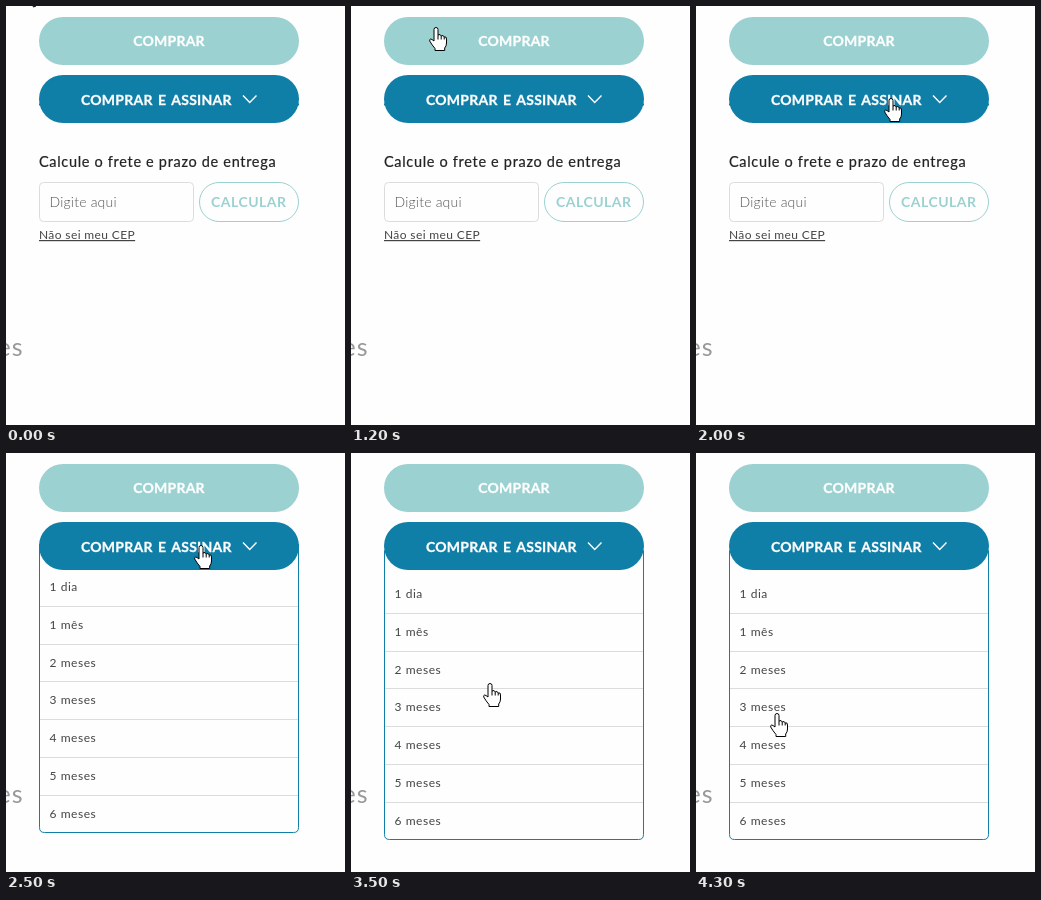
Write an HTML page that moves like this. It is 339x419 px and loops after 4.6 s.

```html
<!DOCTYPE html>
<html lang="pt">
<head>
<meta charset="utf-8">
<style>
  html, body { margin: 0; width: 100%; height: 100%; overflow: hidden; background: #fefefe; }
  svg { display: block; width: 339px; height: 419px; }
  text { font: 14px Lato, "Open Sans", sans-serif; fill: #222; }
  .bold { font-weight: 700; fill: #fff; stroke: #fff; stroke-width: .3px; letter-spacing: .25px; word-spacing: 1.7px; }
  .title { font-size: 14.5px; letter-spacing: .68px; stroke: #222; stroke-width: .2px; }
  .hint { font-weight: 300; fill: #555; letter-spacing: .2px; }
  .calc { font-weight: 700; fill: #9bd1d1; letter-spacing: .5px; }
  .link { font-size: 12px; fill: #444; letter-spacing: .38px; text-decoration: underline; }
  .heading { font-size: 25px; fill: #999; letter-spacing: 1px; }
  .item { font-size: 12px; fill: #444; letter-spacing: .55px; }
  .line { fill: none; stroke: #dcdcdc; }
  .cursor path { fill: #fff; stroke: #000; stroke-linejoin: round; }
</style>
</head>
<body>
<svg viewBox="0 0 339 419">
  <text class="heading" x="17.5" y="350" text-anchor="end">es</text>

  <g id="form">
    <text class="title" x="33" y="161">Calcule o frete e prazo de entrega</text>
    <rect class="line" x="33.5" y="176.5" width="154" height="39" rx="4"/>
    <text class="hint" x="43.5" y="201">Digite aqui</text>
    <rect x="193.5" y="176.5" width="99" height="39" rx="19.5" fill="none" stroke="#9bd1d1"/>
    <text class="calc" x="205" y="201">CALCULAR</text>
    <text class="link" x="33" y="233">Não sei meu CEP</text>
  </g>

  <g id="menu">
    <path d="M33.5 98V381.5q0 5 5 5H287.5q5 0 5-5V98" fill="#fefefe" stroke="#107fa8"/>
  </g>

  <rect x="33" y="11" width="260" height="48" rx="24" fill="#9bd1d1"/>
  <text class="bold" x="163" y="40" text-anchor="middle">COMPRAR</text>
  <path d="M33 98.5H293" stroke="#107fa8" stroke-width="2"/>
  <rect x="33" y="69" width="260" height="48" rx="24" fill="#107fa8"/>
  <text class="bold" x="75" y="99">COMPRAR E ASSINAR</text>
  <path d="M237 89.5l6.7 7 6.8-7" fill="none" stroke="#fff" stroke-width="1.4"/>

  <g id="arrow" class="cursor">
    <path d="M0 0V16L4 12.5L6.5 18L9 17L6.5 12H12Z"/>
  </g>
  <g id="hand" class="cursor">
    <path d="M-2 14V2.5Q-2 .5 0 .5T2 2.5V8Q4.5 6.5 5.2 9Q7.5 7.5 8.2 10Q10.5 9 10.5 12V16Q10.5 19 8.7 21V23.5H-1V21.5Q-4 18 -6.3 14Q-6.6 10 -2 14Z"/>
    <path d="M2 8v4.5M5.2 9v3.5M8.2 10v2.5"/>
  </g>
</svg>
<script>
  const $ = id => document.getElementById(id);
  const LOOP = 4600, STEP = 100, OPEN = 2500, ROW = 37.8;

  const labels = ["1 dia", "1 mês", ...[2, 3, 4, 5, 6].map(n => n + " meses")];
  $("menu").innerHTML += labels.map((label, i) => {
    const y = Math.round(i * ROW);
    const rule = i ? `<path class="line" d="M34 ${y + 122.5}H292"/>` : "";
    return `${rule}<text class="item" x="43.5" y="${y + 145}">${label}</text>`;
  }).join("");

  // Pointer moves: begin, end, x, y; it rests in the gaps
  const moves = [
    [700, 800, 21, -14],
    [900, 1500, 149, 56],
    [1500, 1700, 215, 82],
    [1800, 2000, 195, 92],
    [2700, 3000, 183, 142],
    [3000, 3500, 139, 230],
    [3500, 4000, 89, 272],
    [4000, 4300, 81, 260]
  ];

  const pointer = t => moves.reduce(([x, y], [begin, end, toX, toY]) => {
    const k = Math.min(1, Math.max(0, (t - begin) / (end - begin)));
    return [x + (toX - x) * k, y + (toY - y) * k];
  }, [21, -17]).map(Math.round);

  const show = (id, on) => $(id).setAttribute("visibility", on ? "visible" : "hidden");
  const shift = (id, x, y) => $(id).setAttribute("transform", `translate(${x} ${y})`);

  function draw(time) {
    const t = Math.floor(time % LOOP / STEP) * STEP;
    const open = t >= OPEN;
    show("menu", open);
    show("form", !open);
    shift("menu", 0, t === OPEN ? -7 : 0);

    const [x, y] = pointer(t);
    const clickable = x > 33 && x < 293 && (y > 11 && y < 59 || y > 69 && (y < 117 || open));
    show("hand", clickable);
    show("arrow", !clickable);
    shift(clickable ? "hand" : "arrow", x, y);
  }

  const start = performance.now();
  function tick() {
    draw(performance.now() - start);
    requestAnimationFrame(tick);
  }
  tick();
</script>
</body>
</html>
```
